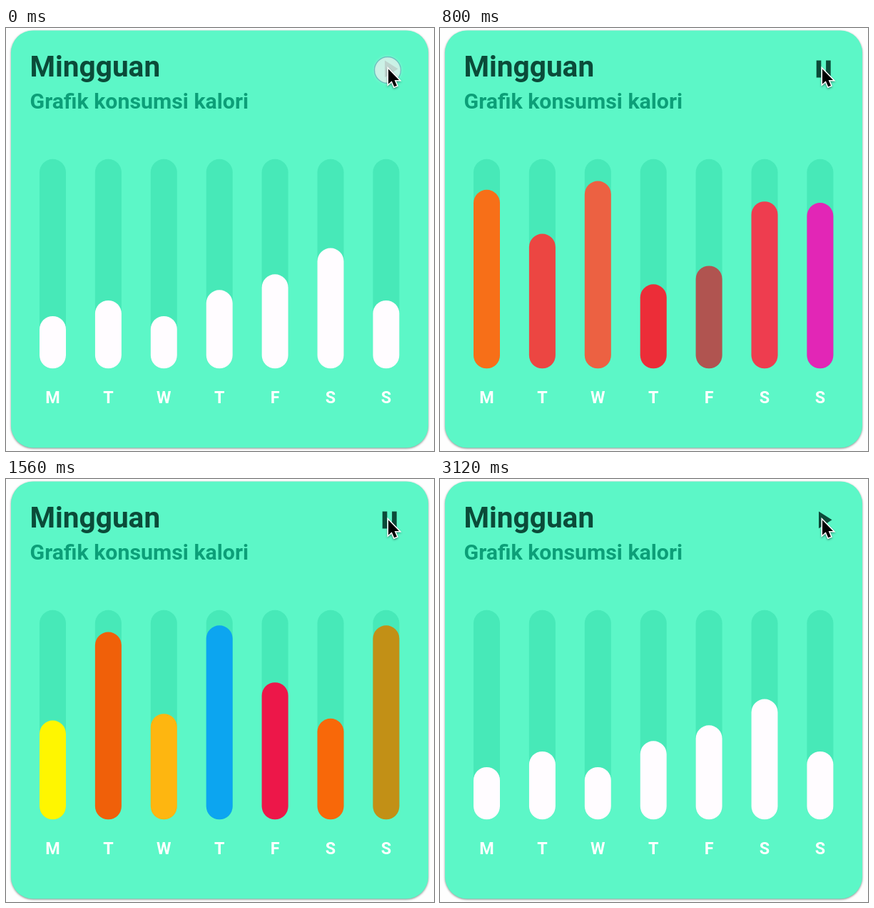
Recreate the animation shown at these times as an HTML page with a canvas. Size 600x593 px, loop 3200 ms.

```html
<!DOCTYPE html>
<html lang="id">
<head>
<meta charset="utf-8">
<title>Mingguan</title>
<style>
  html, body { margin: 0; width: 100%; height: 100%; overflow: hidden; background: #fefefe; }
  canvas { display: block; width: 600px; height: 593px; }
</style>
</head>
<body>
<canvas id="stage" width="600" height="593"></canvas>
<script>
const canvas = document.getElementById('stage');
const ctx = canvas.getContext('2d');
const dpr = window.devicePixelRatio || 1;
canvas.width = 600 * dpr;
canvas.height = 593 * dpr;

const LOOP = 3200, PLAY = 134, STOP = 1989, STEP = 300, TWEEN = 250;
const FONT = 'Roboto, "Open Sans", Arial, sans-serif';
const DARK = '#0b4b39';
const DAYS = ['M', 'T', 'W', 'T', 'F', 'S', 'S'];
const BASE_Y = 477.3, UNIT = 14.675, BAR_W = 37;

const WHITE = 'fffcff', YELLOW = 'ffff00', ORANGE = 'fc9800', PINK = 'f00060',
      BLUE = '0ca5f0', PURPLE = 'e000f8', AMBER = 'ffe54c';

const REST = { v: [5, 6.5, 5, 7.5, 9, 11.5, 6.5], c: Array(7).fill(WHITE) };
const ROUNDS = [
  { v: [18, 16, 17, 6, 13, 11, 14],
    c: ['f0f010', 'f00040', 'f03c00', 'f00050', 'f48400', 'e80050', BLUE] },
  { v: [16, 12, 18, 7, 9, 17, 18],
    c: [ORANGE, 'f06000', 'f08400', 'ea3030', 'f03410', 'e80050', PURPLE] },
  { v: [20, 15.2, 17.65, 10.9, 12, 13.1, 9.9],
    c: ['e90058', PURPLE, PURPLE, 'f2244c', '00acfe', AMBER, 'e98c00'] },
  { v: [14, 17, 11, 14, 14, 16, 14],
    c: [ORANGE, PINK, PINK, BLUE, YELLOW, PINK, BLUE] },
  { v: [9, 18, 10, 19, 13, 9, 19],
    c: [YELLOW, 'f06a00', 'ffc808', BLUE, 'eb0050', 'f97300', 'd48e00'] },
  { v: [18, 12, 15, 6, 14, 13, 18],
    c: [PINK, 'ec6040', ORANGE, BLUE, PINK, AMBER, PINK] },
  { v: [13.5, 16.5, 13, 14, 9, 17.5, 17],
    c: [PINK, PURPLE, ORANGE, BLUE, PURPLE, ORANGE, PINK] }
];

const clamp = x => Math.max(0, Math.min(1, x));
const lerp = (a, b, p) => a + (b - a) * p;
const rgb = hex => [0, 2, 4].map(i => parseInt(hex.substr(i, 2), 16));
for (const s of [REST, ...ROUNDS]) s.c = s.c.map(rgb);

function blend(a, b, p) {
  return {
    v: a.v.map((x, i) => lerp(x, b.v[i], p)),
    c: a.c.map((col, i) => col.map((x, k) => lerp(x, b.c[i][k], p)))
  };
}

function playing(t) {
  const k = Math.min(ROUNDS.length - 1, Math.floor((t - PLAY) / STEP));
  const from = k ? ROUNDS[k - 1] : REST;
  return blend(from, ROUNDS[k], clamp((t - PLAY - k * STEP) / TWEEN));
}

const halted = playing(STOP);

function bars(t) {
  if (t < PLAY) return REST;
  if (t < STOP) return playing(t);
  return blend(halted, REST, clamp((t - STOP) / TWEEN));
}

function shape(points, color) {
  ctx.beginPath();
  points.forEach(([x, y]) => ctx.lineTo(x, y));
  ctx.closePath();
  ctx.fillStyle = color;
  ctx.fill();
}

function disc(x, y, r, color) {
  ctx.beginPath();
  ctx.arc(x, y, r, 0, Math.PI * 2);
  ctx.fillStyle = color;
  ctx.fill();
}

function pill(x, height, color) {
  ctx.beginPath();
  ctx.roundRect(x, BASE_Y - height, BAR_W, height, BAR_W / 2);
  ctx.fillStyle = color;
  ctx.fill();
}

function text(str, x, y, size, color, align) {
  ctx.font = `bold ${size}px ${FONT}`;
  ctx.textAlign = align;
  ctx.fillStyle = color;
  ctx.fillText(str, x, y);
}

function cardPath() {
  ctx.beginPath();
  ctx.roundRect(7, 3.5, 585, 585, 31);
}

function drawCard() {
  ctx.save();
  ctx.shadowColor = 'rgba(0,0,0,.45)';
  ctx.shadowBlur = 3 * dpr;
  ctx.shadowOffsetY = dpr;
  cardPath();
  ctx.fillStyle = '#5cf7c7';
  ctx.fill();
  ctx.restore();
}

// Press highlight: rises before the release, fades after it
function drawHighlight(t, release) {
  const a = t < release ? clamp((t - release + 100) / 100) : clamp(1 - (t - release) / 200);
  if (!a) return;
  ctx.save();
  cardPath();
  ctx.clip();
  disc(537.7, 57.5, 58.8, `rgba(188,188,188,${0.22 * a})`);
  ctx.restore();
}

function drawTouch(t, release) {
  const a = t < release ? clamp((t - release + 140) / 6) : clamp(1 - (t - release) / 110);
  if (!a) return;
  ctx.save();
  ctx.globalAlpha = a;
  ctx.shadowColor = 'rgba(255,255,255,.6)';
  ctx.shadowBlur = 4 * dpr;
  disc(535, 59, 18.5, 'rgba(222,238,234,.7)');
  ctx.shadowBlur = 0;
  ctx.lineWidth = 1.4;
  ctx.strokeStyle = 'rgba(90,170,180,.7)';
  ctx.stroke();
  ctx.restore();
}

function drawIcon(on) {
  if (on) {
    ctx.fillStyle = DARK;
    ctx.fillRect(527.7, 45.5, 6.6, 24);
    ctx.fillRect(541.1, 45.5, 6.6, 24);
  } else {
    shape([[531, 45.5], [549.5, 57.3], [531, 69.2]], DARK);
  }
}

function drawCursor() {
  const arrow = [[0, 0], [0, 21], [4.8, 16.8], [8.2, 24.8], [12, 23.2], [8.6, 15.4], [15, 15.4]]
    .map(([x, y]) => [x + 536, y + 57.5]);
  ctx.save();
  ctx.shadowColor = 'rgba(0,0,0,.35)';
  ctx.shadowBlur = 3 * dpr;
  ctx.shadowOffsetY = 1.5 * dpr;
  shape(arrow, '#000');
  ctx.lineWidth = 3;
  ctx.lineJoin = 'miter';
  ctx.strokeStyle = '#fff';
  ctx.stroke();
  ctx.restore();
  shape(arrow, '#000');
}

function draw(t) {
  ctx.setTransform(dpr, 0, 0, dpr, 0, 0);
  ctx.fillStyle = '#fefefe';
  ctx.fillRect(0, 0, 600, 593);
  drawCard();
  drawHighlight(t, PLAY);
  drawHighlight(t, STOP);

  text('Mingguan', 33.5, 68, 40.6, DARK, 'left');
  text('Grafik konsumsi kalori', 33.5, 112.5, 30.3, '#0c9f78', 'left');

  const { v, c } = bars(t);
  DAYS.forEach((day, i) => {
    const x = 47 + i * 77.9;
    pill(x, 20 * UNIT, '#47e9b8');
    pill(x, v[i] * UNIT, `rgb(${c[i].map(Math.round)})`);
    text(day, x + BAR_W / 2, 526, 23.4, '#fff', 'center');
  });

  drawIcon(t >= PLAY && t < STOP);
  drawTouch(t, PLAY);
  drawTouch(t, STOP);
  drawCursor();
}

const start = performance.now();
function tick() {
  draw((performance.now() - start) % LOOP);
  requestAnimationFrame(tick);
}
tick();
</script>
</body>
</html>
```
